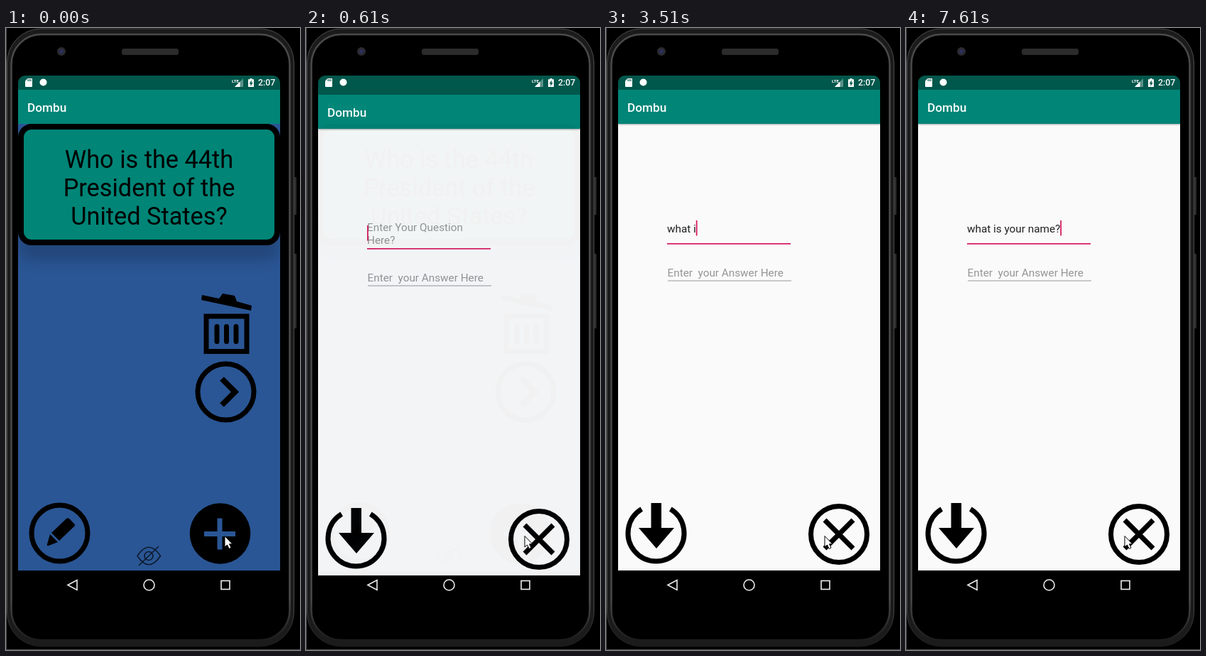
Animation of 414 by 876 pixels, one loop 8000 ms. Source, as an HTML page:

```html
<!DOCTYPE html>
<html lang="en">
<head>
<meta charset="utf-8">
<title>Flashcard app</title>
<style>
  html, body { margin: 0; width: 100%; height: 100%; overflow: hidden; background: #000; }
  svg { display: block; font-family: Roboto, sans-serif; }
  text { white-space: pre; }
  .line { fill: none; stroke: #000; stroke-width: 7; }
  .title { font-size: 17.2px; font-weight: 500; fill: #fff; }
  .field { font-size: 15.3px; fill: #959595; }
  .card { filter: drop-shadow(0 22px 9px rgba(0, 0, 0, .17)); }
  .bar { filter: drop-shadow(0 1.5px 1px rgba(0, 0, 0, .35)); }
</style>
</head>
<body>
<svg width="414" height="876" viewBox="0 0 414 876">
  <defs>
    <linearGradient id="rim" x2="0" y2="1">
      <stop offset="0" stop-color="#4a4a4a"/>
      <stop offset=".93" stop-color="#4a4a4a"/>
      <stop offset="1" stop-color="#1c1c1c"/>
    </linearGradient>
    <clipPath id="screen"><path d="M17 764V77a10 10 0 0 1 10-10H376a10 10 0 0 1 10 10V764Z"/></clipPath>
  </defs>

  <!-- phone body -->
  <rect width="414" height="876"/>
  <path d="M.5 0V875.5H414" fill="none" stroke="#4c4c4c"/>
  <path d="M405 210h4v53h-4zM405 318h4v105h-4z" fill="#2c2c2c"/>
  <rect x="1.500" y="1" width="404" height="870" rx="48" fill="#1b1b1b" stroke="url(#rim)"/>
  <rect x="7.500" y="9" width="392" height="853" rx="42" stroke="url(#rim)" stroke-width="2.500"/>
  <circle cx="78" cy="33" r="6" fill="#2b2b30"/>
  <circle cx="78" cy="33" r="2.800" fill="#2c3060"/>
  <rect x="163" y="29" width="80" height="9" rx="3" fill="#2b2b2b"/>

  <!-- question screen -->
  <g clip-path="url(#screen)">
    <path fill="#2a5695" d="M17 135h369v629H17z"/>
    <path fill="#008577" d="M17 87h369v48H17z"/>
    <path fill="#00574b" d="M17 67h369v20H17z"/>
    <text class="title" x="30" y="118">Dombu</text>
    <g class="card">
      <rect x="21" y="139" width="361" height="163" rx="15" fill="#008577" stroke="#000" stroke-width="8"/>
    </g>
    <g font-size="34.3" text-anchor="middle">
      <text x="201.5" y="197">Who is the 44th</text>
      <text x="201.5" y="237">President of the</text>
      <text x="201.5" y="277">United States?</text>
    </g>
    <path d="M276 376 300 381 305 374 322 377 325 385 346 391 345 398 275 383Z"/>
    <rect class="line" x="282" y="406" width="57" height="49.5" stroke-width="8"/>
    <path class="line" stroke-linecap="round" d="M297 420.500v21M310.500 420.500v21M324 420.500v21"/>
    <circle class="line" cx="309.500" cy="512.500" r="39.500"/>
    <path class="line" style="stroke-width:8" d="M304 494 322.500 512.500 304 531"/>
    <circle class="line" cx="75.500" cy="711.500" r="39.500"/>
    <path d="M64 711 85 691q2-1.500 4 0l7 7q2 2 0 4L75 722ZM62 713 73 724 60 729q-3 1-2-2Z"/>
    <circle cx="301.500" cy="712" r="42.800"/>
    <path class="line" style="stroke:#2a5695" d="M279 712.500h44M301 690.500v44"/>
    <g fill="none" stroke="#0d1b30" stroke-width="1.700">
      <path d="M185 743.500Q201 719 217.500 743.500Q201 768 185 743.500ZM187 757 215 730"/>
      <circle cx="201" cy="743.500" r="6"/>
    </g>
  </g>

  <!-- new card form, slides up and fades in -->
  <g id="form">
    <path fill="#fafafa" d="M17 87h369v677H17z"/>
    <path class="bar" fill="#008577" d="M17 87h369v48H17z"/>
    <path fill="#00574b" d="M17 77a10 10 0 0 1 10-10H376a10 10 0 0 1 10 10V87H17z"/>
    <text class="title" x="30" y="118">Dombu</text>
    <g id="hint" class="field">
      <text x="86" y="279">Enter Your Question</text>
      <text x="86" y="297">Here?</text>
    </g>
    <text id="typed" class="field" x="86" y="288" style="fill:#212121"></text>
    <rect id="caret" y="271" width="1.800" height="21.500" fill="#d81b60"/>
    <path fill="#d81b60" d="M86 303h174v1.800H86z"/>
    <text class="field" x="86.500" y="350">Enter  your Answer Here</text>
    <path fill="#999" d="M87 355.500h174v1H87z"/>
    <path class="line" d="M50.200 677.600A39.500 39.500 0 1 0 90.800 677.600"/>
    <path d="M63.500 669h14.500v35h18L71 733 46 704h17.500z"/>
    <circle class="line" cx="328" cy="713" r="39.500"/>
    <path class="line" d="M308 693 348 733M348 693 308 733"/>
  </g>

  <!-- system icons -->
  <g fill="#fff">
    <path d="M30.500 71H36q1 0 1 1V82q0 1-1 1H28q-1 0-1-1V74.500Z"/>
    <path stroke="#00574b" d="M31 72v3M33 72v3M35 72v3"/>
    <circle cx="52.500" cy="76.500" r="5"/>
    <text x="318" y="77" font-size="6.200" font-weight="700">LTE</text>
    <path fill-opacity=".35" d="M322 83 334 71V83Z"/>
    <path d="M322 83 329.500 75.500V83Z"/>
    <path d="M343.500 71h3v1.200H349V83h-8V72.200h2.500z"/>
    <path fill="#00574b" d="M345.800 73.500 342.500 78.500h2v3.500l3.200-5h-1.900z"/>
    <text x="355" y="81" font-size="12.300" font-weight="500">2:07</text>
  </g>
  <g fill="none" stroke="#eee" stroke-width="1.600">
    <path d="M87 784.500 100 777.500V791.500Z"/>
    <circle cx="201.500" cy="784.500" r="7.500"/>
    <rect x="303" y="778.500" width="12" height="12"/>
  </g>
  <path fill="#fff" stroke="#000" d="M308 715.500V731L311.500 728 314.200 733.500 317 732 314.500 726.800H319Z"/>
</svg>
<script>
const LOOP = 8000, QUESTION = "what is your name?";
const keyTimes = [1950, 2190, 2460, 2670, 3170, 3510, 3760, 3970, 4500,
  4690, 5030, 5230, 5670, 6250, 6500, 6620, 6930, 7610];
const caretOff = [[830, 1140], [1630, 1950], [6170, 6250], [7400, 7610]];
const slideSteps = [500, 550, 580, 620, 650, 690];
const SLIDE_START = 466, TRAVEL = 57;

const [form, hint, typed, caret] =
  ["form", "hint", "typed", "caret"].map(id => document.getElementById(id));
const pen = document.createElement("canvas").getContext("2d");
pen.font = "15.3px Roboto, sans-serif";

const show = (el, on) => el.setAttribute("visibility", on ? "visible" : "hidden");
const remaining = (t, duration) => Math.max(0, 1 - t / duration);

function draw(t) {
  const step = slideSteps.filter(s => s <= t).pop();
  form.setAttribute("display", step ? "inline" : "none");
  if (!step) return;

  // the window lands on whole pixels while it decelerates
  const age = step - SLIDE_START;
  const dy = Math.round(TRAVEL * remaining(age, 330) ** 5);
  form.setAttribute("transform", `translate(0 ${dy})`);
  form.setAttribute("opacity", 1 - remaining(age, 200) ** 4);

  const text = QUESTION.slice(0, keyTimes.filter(k => k <= t).length);
  typed.textContent = text;
  show(hint, !text);
  caret.setAttribute("x", 86 + pen.measureText(text).width);
  show(caret, !caretOff.some(([from, to]) => t >= from && t < to));
}

const start = performance.now();
function tick() {
  draw((performance.now() - start) % LOOP);
  requestAnimationFrame(tick);
}
tick();
</script>
</body>
</html>
```
